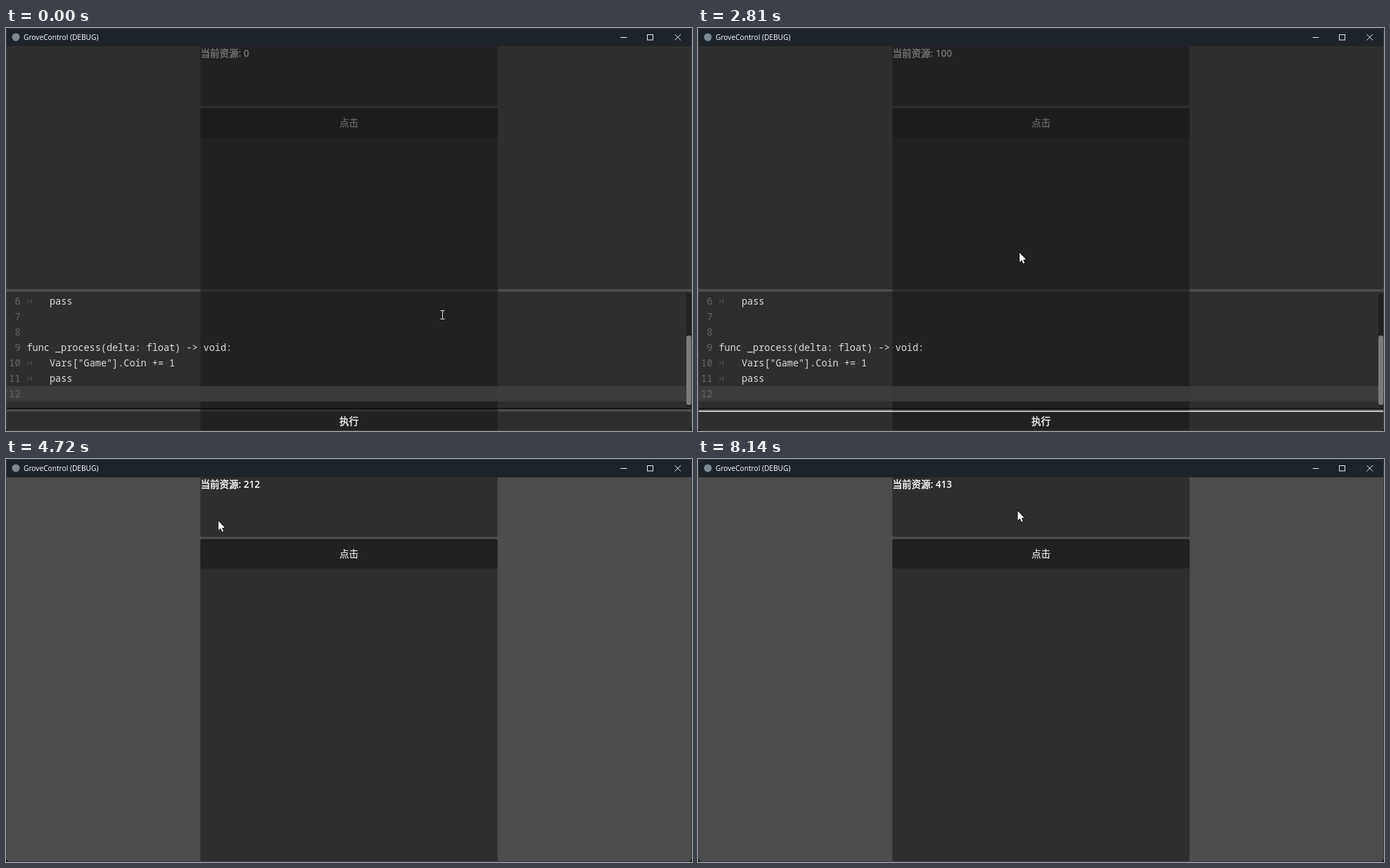
These frames come from a looping animation (975 by 574 pixels, 8210 ms). An HTML page with a canvas:

```html
<!DOCTYPE html>
<html lang="zh">
<head>
<meta charset="utf-8">
<title>GroveControl</title>
<style>
  html, body { margin: 0; width: 100%; height: 100%; overflow: hidden; background: #151719; }
  canvas { display: block; }
</style>
</head>
<body>
<canvas id="stage" width="975" height="574"></canvas>
<script>
const ctx = document.getElementById('stage').getContext('2d');
const LOOP = 8210, TICKS = 120, LEAD = 25;
const PRESS = 15, RELEASE = 17, CLOSE = 42;          // in ticks
const LATIN = '"Open Sans", sans-serif';
const HAN = '13.5px "Noto Sans CJK SC", "Noto Sans CJK", sans-serif';
const MONO = '13.5px "Noto Sans Mono", monospace';
const CHAR = 8.1, ROW = 22;
const NORMAL = 'rgba(26,26,26,.6)', HOVER = 'rgba(57,57,57,.6)', PRESSED = 'rgba(0,0,0,.6)';

// Key points of the pointer: tick, x, y
const PATH = [
  [0, 620, 408], [1, 620, 408], [11, 432.5, 555.5], [27, 432.5, 555.5], [38, 457, 320],
  [43, 457, 320], [58, 376, 39], [65, 250, 45], [71, 340, 100], [75, 402, 40],
  [78, 290, 3], [81, 293.5, 86.5], [89, 454.5, 74], [TICKS, 454.5, 74]
];

const tickAt = ms => Math.min(TICKS - 1, Math.floor((ms + LEAD) * TICKS / LOOP));
const coins = tick => Math.floor(4.016 * Math.max(0, tick - 16));

function slope(i, axis) {
  const a = PATH[i - 1], p = PATH[i], b = PATH[i + 1];
  if (!a || !b || a[axis] === p[axis] || b[axis] === p[axis]) return 0;
  return (b[axis] - a[axis]) / (b[0] - a[0]);
}

function pointer(tick) {
  const i = PATH.findLastIndex(p => tick >= p[0]);
  const p = PATH[i], q = PATH[i + 1], span = q[0] - p[0], u = (tick - p[0]) / span;
  const eased = u * u * (3 - 2 * u);
  return [1, 2].map(axis => p[axis] + (q[axis] - p[axis]) * eased
    + span * u * (1 - u) * ((1 - u) * slope(i, axis) - u * slope(i + 1, axis)));
}

function box(x, y, w, h, color, radius = 0) {
  ctx.fillStyle = color;
  ctx.beginPath();
  ctx.roundRect(x, y, w, h, radius);
  ctx.fill();
}

function text(str, x, y, font, color, align = 'left', weight = 0) {
  ctx.font = font;
  ctx.fillStyle = ctx.strokeStyle = color;
  ctx.textAlign = align;
  ctx.fillText(str, x, y);
  if (weight) {
    ctx.lineWidth = weight;
    ctx.strokeText(str, x, y);
  }
}

function line(points, color, width = 1) {
  ctx.strokeStyle = color;
  ctx.lineWidth = width;
  ctx.beginPath();
  points.forEach(([x, y]) => ctx.lineTo(x, y));
  ctx.stroke();
}

function titleBar() {
  box(0, 0, 975, 26, '#1c2329');
  box(8.5, 7.5, 11, 11, '#7d8890', 5.5);
  text('GroveControl (DEBUG)', 25, 17, '10.2px ' + LATIN, '#fff');
  line([[873.5, 13.5], [882.5, 13.5]], '#e8e8e8');
  ctx.strokeRect(911.5, 9.5, 8, 7.5);
  line([[950.5, 9], [959, 17.5]], '#e8e8e8');
  line([[959, 9], [950.5, 17.5]], '#e8e8e8');
}

function game(tick, y, open) {
  const hover = !open && y >= 114 && y < 156;
  box(0, 26, 975, 548, '#4d4d4d');
  box(276.2, 26, 422.5, 84.7, NORMAL, [0, 0, 2.5, 2.5]);
  box(276.2, 114, 422.5, 459, NORMAL, 2.5);
  box(276.2, 114, 422.5, 42, hover ? HOVER : NORMAL, 2.5);
  text('当前资源', 276.5, 41.2, HAN, '#fff', 'left', .4);
  text(': ' + coins(tick), 330.5, 41.2, '600 13.5px ' + LATIN, '#fff');
  text('点击', 487.4, 140.3, HAN, hover ? '#f2f2f2' : '#e0e0e0', 'center', .25);
}

function codeRow(number, str = '', tabbed = false) {
  const y = 394.3 + (number - 6) * ROW, left = tabbed ? 62 : 29.5;
  text(number, 20.5, y, MONO, '#686868', 'right');
  if (tabbed) {
    line([[30, y - 7.5], [33, y - 5], [30, y - 2.5]], '#5c5c5c');
    line([[35.5, y - 8], [35.5, y - 2]], '#5c5c5c');
  }
  text(str, left, y, MONO, '#dcdcdc');
  [...str].forEach((ch, i) => {
    if (ch === ' ') box(left + (i + .5) * CHAR - .7, y - 5.5, 1.4, 1.4, '#505050');
  });
}

function consolePanel(tick, y) {
  const pressed = tick >= PRESS && tick < RELEASE, focused = tick >= PRESS, hover = y > 546;
  box(1, 26, 973, 346, NORMAL, [0, 0, 2.5, 2.5]);
  box(1, 375.4, 973, 167.6, NORMAL, 2.5);
  box(1, 541.3, 973, 1.7, PRESSED);
  box(1, 510, 966, 21.7, 'rgba(64,64,66,.8)');
  box(967, 378, 7, 162, NORMAL, 3);
  box(967, 438, 7, 99, 'rgba(255,255,255,.4)', 3);

  codeRow(6, 'pass', true);
  codeRow(7);
  codeRow(8);
  codeRow(9, 'func _process(delta: float) -> void:');
  codeRow(10, 'Vars["Game"].Coin += 1', true);
  codeRow(11, 'pass', true);
  codeRow(12);

  box(1, 546.3, 973, 27, pressed ? PRESSED : hover ? HOVER : NORMAL, 2.5);
  if (focused) box(1, 545, 973, 1.7, 'rgba(255,255,255,.75)');
  text('执行', 487.4, 564.8, HAN, '#f2f2f2', 'center', .4);
}

function arrow(x, y) {
  ctx.save();
  ctx.translate(x, y);
  ctx.beginPath();
  [[0, 0], [0, 13.4], [3.1, 10.6], [5.2, 15.4], [7.2, 14.5], [5.2, 9.9], [9, 9.5]]
    .forEach(([px, py]) => ctx.lineTo(px, py));
  ctx.closePath();
  ctx.strokeStyle = '#000';
  ctx.lineWidth = 1.4;
  ctx.stroke();
  ctx.fillStyle = '#fff';
  ctx.fill();
  ctx.restore();
}

function beam(x, y) {
  line([[x, y - 5.5], [x, y + 5.5]], '#e0e0e0');
  for (const end of [y - 6, y + 6]) line([[x - 3, end], [x + 3, end]], '#e0e0e0');
}

function draw(ms) {
  const tick = tickAt(ms % LOOP), open = tick < CLOSE;
  const [x, y] = pointer(tick);
  box(0, 0, 975, 574, '#151719');
  ctx.save();
  ctx.beginPath();
  ctx.roundRect(0, 0, 975, 574, [0, 0, 6, 6]);
  ctx.clip();
  game(tick, y, open);
  if (open) consolePanel(tick, y);
  titleBar();
  ctx.restore();
  ctx.strokeStyle = '#393d40';
  ctx.lineWidth = 1;
  ctx.beginPath();
  ctx.roundRect(.5, .5, 974, 573, 6);
  ctx.stroke();
  if (open && y > 375 && y < 543) beam(Math.round(x) + .5, Math.round(y) + .5);
  else arrow(x, y);
}

const begin = performance.now();
function loop() {
  draw(performance.now() - begin);
  requestAnimationFrame(loop);
}
loop();
</script>
</body>
</html>
```
